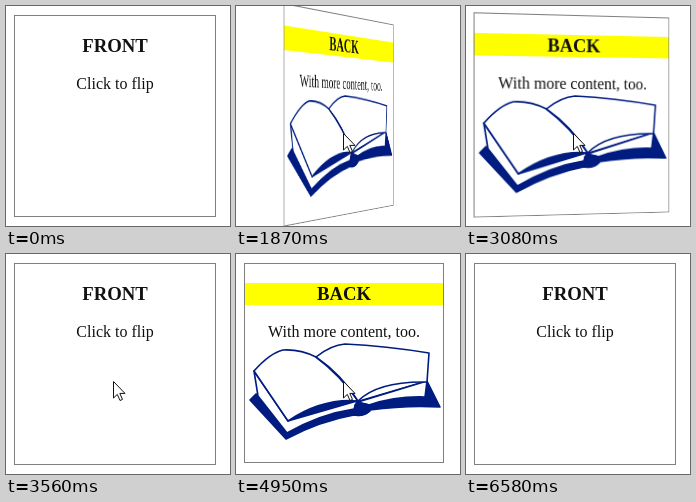
Write an HTML page that moves like this. It is 224 px wide and 220 px high and loops after 7320 ms.

```html
<!DOCTYPE html>
<html lang="en">
<head>
<meta charset="utf-8">
<title>Flip card</title>
<style>
  html, body { margin: 0; width: 100%; height: 100%; overflow: hidden; background: #fff; }
  body { position: relative; font: 16px "Liberation Serif", serif; color: #111; text-align: center; }
  .scene { position: absolute; left: 8px; top: 9px; width: 202px; height: 202px; perspective: 800px; }
  .card { position: absolute; inset: 0; transform-style: preserve-3d; }
  .face {
    position: absolute; top: 0; right: 0; width: 202px; height: 202px;
    box-sizing: border-box; border: 1px solid gray; background: #fff;
    backface-visibility: hidden;
  }
  .back { width: 200px; height: 200px; transform: rotateY(180deg); }
  h3 { margin: 18.72px 0; font-size: 18.72px; }
  p { margin: 0; white-space: nowrap; }
  .back h3 { background: #ff0; }
  .book { position: absolute; left: -1px; top: -1px; }
  #cursor { position: absolute; left: 0; top: 0; overflow: visible; }
</style>
</head>
<body>
<div class="scene">
  <div class="card" id="card">
    <div class="face"><h3>FRONT</h3><p>Click to flip</p></div>
    <div class="face back">
      <h3>BACK</h3><p>With more content, too.</p>
      <svg class="book" width="200" height="200" viewBox="8 9 200 200"
           fill="#fff" stroke="#001c80" stroke-width="1.6" stroke-linejoin="round">
        <!-- cover -->
        <path fill="#001c80" d="M20 140L14 146L50 185Q84 167 118 161Q127 163 134 156Q170 151 204 153L191 127L120 148Z"/>
        <!-- page blocks -->
        <path d="M18 117L22 142L51 179Q84 160 118 155L121 147L52 167Z"/>
        <path d="M122 148L133 151Q160 142 189 143L191 127Z"/>
        <!-- pages -->
        <path d="M18 117Q34 99 47 96Q64 95 80 103Q104 121 122 147Q86 144 52 167Z"/>
        <path d="M80 103Q95 91 109 90Q150 92 193 99L191 128Q142 127 122 147Q106 121 80 103Z"/>
        <path fill="#001c80" d="M119 151Q126 148 133 151L134 157Q126 164 118 160Z"/>
      </svg>
    </div>
  </div>
</div>
<svg id="cursor" width="13" height="21">
  <path d="M.5 .5V17L4.3 13.4L7 19.5L9.5 18.4L6.8 12.4H12Z" fill="#fff" stroke="#111"/>
</svg>
<script>
const LOOP = 7320, FLIP = 500, STEP = 80, LEAD = 40;
const flips = [1700, 3080, 4470, 5720];
const card = document.getElementById('card');
const cursor = document.getElementById('cursor');

const clamp = v => Math.min(1, Math.max(0, v));
const mix = (a, b, k) => a + (b - a) * k;

// cubic-bezier(.25, .1, .25, 1)
function ease(x) {
  if (x <= 0 || x >= 1) return clamp(x);
  const bezier = (a, b, s) => 3 * (1 - s) ** 2 * s * a + 3 * (1 - s) * s * s * b + s ** 3;
  let lo = 0, hi = 1;
  for (let i = 0; i < 24; i++) {
    const mid = (lo + hi) / 2;
    if (bezier(.25, .25, mid) < x) lo = mid; else hi = mid;
  }
  return bezier(.1, 1, lo);
}

// Motion advances in held steps, like a screen recording.
const held = (t, start, step) => Math.floor((t - start) / step) * step;

function angleAt(t) {
  let angle = 0;
  flips.forEach((start, i) => {
    if (t < start) return;
    const k = ease((held(t, start, STEP) + LEAD) / FLIP);
    angle = -180 * (i % 2 ? 1 - k : k);
  });
  return angle;
}

function cursorAt(t) {
  if (t < 690 || t >= 6580) return null;
  if (t < 6350) {
    const k = 1 - (1 - clamp(held(t, 690, 76) / 380)) ** 2;
    return [mix(174, 107, k), mix(197, 127, k)];
  }
  const k = ((held(t, 6350, 76.7) / 76.7 + 1) / 3) ** 1.6;
  return [mix(107, 120, k), mix(127, 199, k)];
}

function draw(now) {
  const t = now % LOOP;
  card.style.transform = `rotateY(${angleAt(t)}deg)`;
  const at = cursorAt(t);
  cursor.style.display = at ? 'block' : 'none';
  if (at) cursor.style.transform = `translate(${Math.round(at[0])}px, ${Math.round(at[1])}px)`;
}

const origin = performance.now();
function frame() {
  draw(performance.now() - origin);
  requestAnimationFrame(frame);
}
frame();
</script>
</body>
</html>
```
